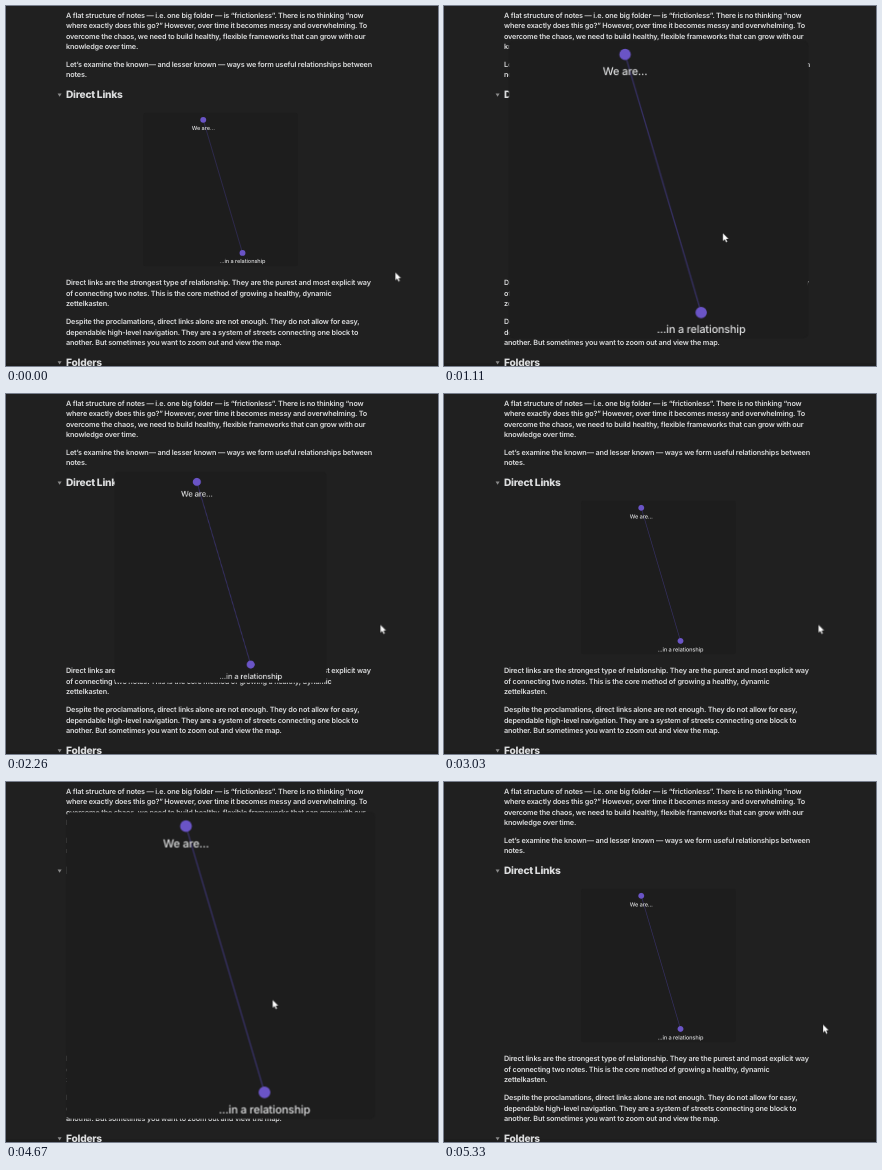
Recreate the animation shown at these times as an HTML page. Size 432 px wide and 360 px high, loop 5810 ms.

```html
<!DOCTYPE html>
<html lang="en">
<head>
<meta charset="utf-8">
<title>Direct Links</title>
<style>
  html, body { margin: 0; width: 100%; height: 100%; overflow: hidden; background: #202020; }
  svg { display: block; width: 432px; height: 360px; }
  text { font-family: Inter, "Open Sans", sans-serif; fill: #dcddde; text-rendering: geometricPrecision; }
  .body { font-size: 7.25px; font-weight: 600; letter-spacing: -.16px; }
  .head { font-size: 10.2px; font-weight: 800; letter-spacing: -.24px; }
  .label { font-size: 11.2px; font-weight: 500; letter-spacing: -.15px; text-anchor: middle; }
  .fold { fill: #8a8a8a; }
  #card, #cursor { transform-origin: 0 0; }
</style>
</head>
<body>
<svg viewBox="0 0 432 360">
  <rect width="432" height="360" fill="#202020"/>
  <rect y="357" width="432" height="3" fill="#1d1d1d"/>
  <g id="page"></g>
  <g id="card">
    <rect x="-154.5" y="-153.5" width="309" height="307" rx="5" fill="#1d1d1d"/>
    <path d="M-34.5-139.3L44 126.8" stroke="#373165" stroke-width="1.3"/>
    <g fill="#6a54c6">
      <circle cx="-34.5" cy="-139.3" r="5.9"/>
      <circle cx="44" cy="126.8" r="5.9"/>
    </g>
    <text class="label" x="-34.5" y="-118.3">We are...</text>
    <text class="label" x="44" y="147.9">...in a relationship</text>
  </g>
  <path id="cursor" d="M0 0V8.3L1.9 6.6L3.2 9.4L4.6 8.8L3.4 6.1H5.9Z" fill="#fff" stroke="#111" stroke-width=".3"/>
</svg>
<script>
const LOOP = 5810, LEADING = 10.55;
const page = document.getElementById('page');

function addText(kind, y, lines) {
  lines.forEach((line, i) => {
    const el = document.createElementNS('http://www.w3.org/2000/svg', 'text');
    el.setAttribute('class', kind);
    el.setAttribute('x', 60);
    el.setAttribute('y', y + i * LEADING);
    el.textContent = line;
    page.append(el);
  });
}

function addHeading(y, title) {
  addText('head', y, [title]);
  const mark = document.createElementNS('http://www.w3.org/2000/svg', 'path');
  mark.setAttribute('class', 'fold');
  mark.setAttribute('d', `M51.6 ${y - 4.4}h4l-2 3.2z`);
  page.append(mark);
}

addText('body', 11.5, [
  'A flat structure of notes — i.e. one big folder — is “frictionless”. There is no thinking “now',
  'where exactly does this go?” However, over time it becomes messy and overwhelming. To',
  'overcome the chaos, we need to build healthy, flexible frameworks that can grow with our',
  'knowledge over time.'
]);
addText('body', 60.7, [
  'Let’s examine the known— and lesser known — ways we form useful relationships between',
  'notes.'
]);
addHeading(92, 'Direct Links');
addText('body', 279.3, [
  'Direct links are the strongest type of relationship. They are the purest and most explicit way',
  'of connecting two notes. This is the core method of growing a healthy, dynamic',
  'zettelkasten.'
]);
addText('body', 318.2, [
  'Despite the proclamations, direct links alone are not enough. They do not allow for easy,',
  'dependable high-level navigation. They are a system of streets connecting one block to',
  'another. But sometimes you want to zoom out and view the map.'
]);
addHeading(359.7, 'Folders');

// Each step: time in ms, values, easing towards the next step
function play(id, steps, pose) {
  const frames = steps.map(([time, values, easing = 'linear']) =>
    ({ offset: time / LOOP, transform: pose(...values), easing }));
  document.getElementById(id).animate(frames, { duration: LOOP, iterations: Infinity });
}

play('cursor', [
  [0, [389.3, 266.2]],
  [670, [389.3, 266.2], 'cubic-bezier(.5,0,.8,.8)'],
  [940, [276.5, 226.8], 'ease-out'],
  [1010, [278.8, 227]],
  [1730, [278.8, 227], 'ease-in-out'],
  [2270, [374.4, 230.6]],
  [3030, [374.4, 230.6], 'cubic-bezier(.42,0,.75,.8)'],
  [3540, [266.5, 217.7]],
  [4670, [266.5, 217.7], 'ease-in-out'],
  [5190, [379, 242.4]],
  [LOOP, [379, 242.4]]
], (x, y) => `translate(${x}px, ${y}px)`);

// Hovering doubles the card, leaving shrinks it back
play('card', [
  [0, [0.5]],
  [937, [0.5], 'ease'],
  [1187, [1]],
  [2170, [1], 'ease'],
  [2420, [0.5]],
  [3422, [0.5], 'ease'],
  [3672, [1]],
  [5075, [1], 'ease'],
  [5325, [0.5]],
  [LOOP, [0.5]]
], s => `translate(214.5px, 183.5px) scale(${s})`);
</script>
</body>
</html>
```
